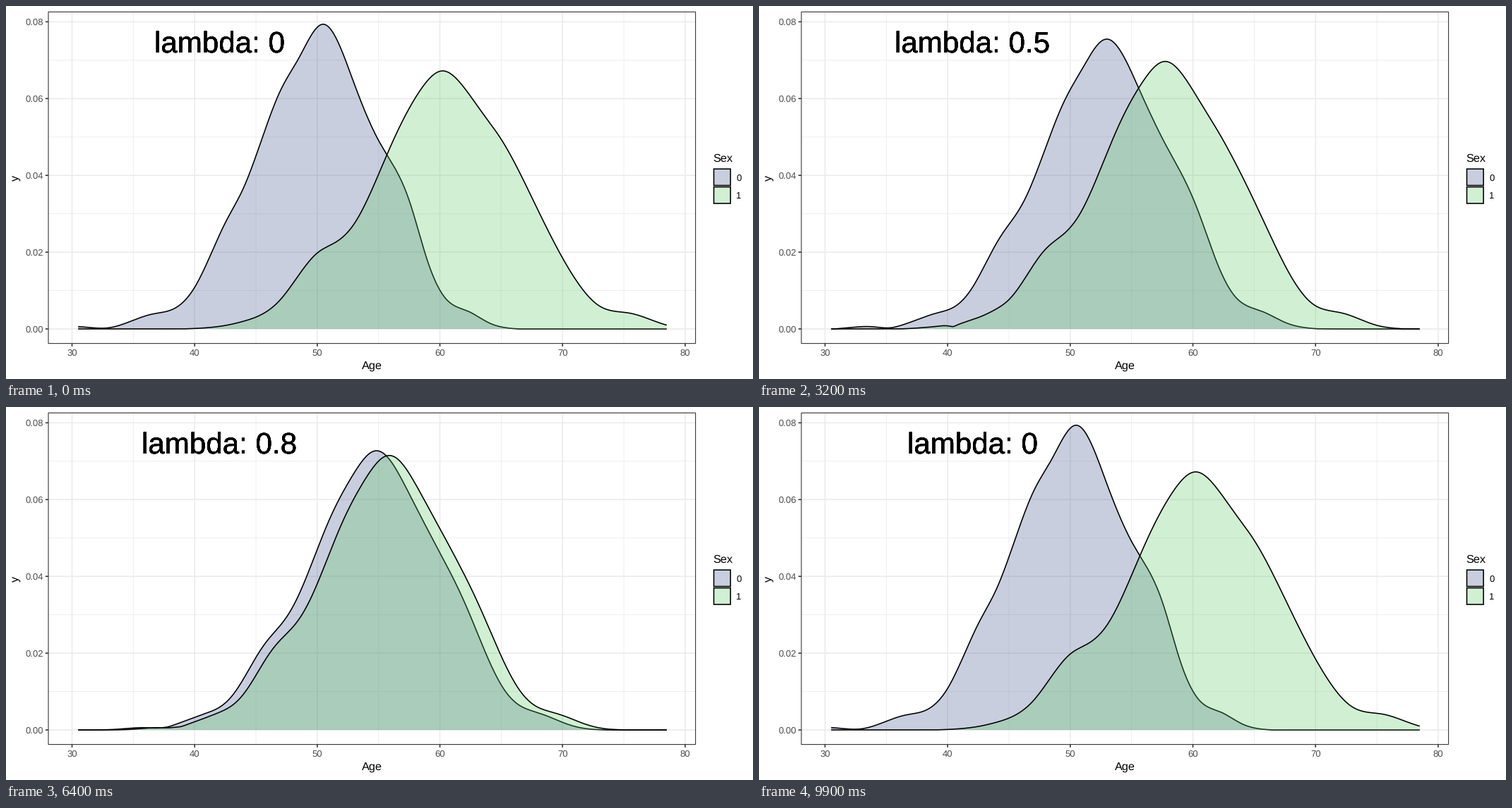
Animation, 1058 px wide and 529 px high, one loop 10 s. Source, as a matplotlib script:

```python
import numpy as np
import matplotlib.pyplot as plt
from matplotlib.animation import FuncAnimation
from matplotlib.patches import Polygon, Rectangle

W, H, DPI = 1058, 529, 128
PT = 72 / DPI  # points per pixel
BLUE, GREEN, ALPHA = "#3B528B", "#5DC863", 0.28
DARK, GRID = "#333333", "#EBEBEB"
LEFT, RIGHT, TOP, BOTTOM = 60, 976.6, 8.4, 478.6
LAMBDAS = [0, 0.5, 0.8, 1]

plt.rcParams["font.family"] = "Liberation Sans"
plt.rcParams["text.hinting"] = "none"

ages = np.linspace(24, 86, 3000)
shown = np.linspace(30.5, 78.5, 512)


def age_px(age):
    return 93.5 + (age - 30) * 17.368


def density_px(density):
    return 458 - density * 5445


def density_through(*points):
    """Natural cubic spline through (age, density in 1e-4) key points."""
    x, y = np.array(points, float).T
    h = np.diff(x)
    system = (np.diag(2 * (h[:-1] + h[1:]))
              + np.diag(h[1:-1], 1) + np.diag(h[1:-1], -1))
    bend = np.zeros(len(x))
    bend[1:-1] = np.linalg.solve(system, 6 * np.diff(np.diff(y) / h))
    i = np.clip(np.searchsorted(x, ages) - 1, 0, len(h) - 1)
    a = (x[i + 1] - ages) / h[i]
    b = 1 - a
    s = (a * y[i] + b * y[i + 1]
         + ((a**3 - a) * bend[i] + (b**3 - b) * bend[i + 1]) * h[i]**2 / 6)
    inside = (ages > x[0]) & (ages < x[-1])
    return np.maximum(np.where(inside, s, 0) * 1e-4, 1e-7)


def cumulative(density):
    total = np.cumsum(density)
    return total / total[-1]


def repair(own, other, lam):
    """Move each quantile of a group by lam towards the mean of both groups."""
    share = cumulative(own)
    twin = np.interp(share, cumulative(other), ages)
    moved = ages + lam * (twin - ages) / 2
    return np.interp(shown, moved, np.gradient(share, moved))


sex0 = density_through(
    (28, 0), (30.5, 6), (33, 3), (36.5, 38), (38.3, 52), (40, 107), (42.5, 274),
    (44, 365), (47, 616), (48.5, 700), (50.5, 788), (53, 636), (55, 488),
    (57.5, 333), (59, 176), (60.5, 78), (62.3, 46), (64, 16), (66, 1), (69, 0))
sex1 = density_through(
    (39, 0), (42.5, 9), (44, 20), (47, 76), (50, 197), (51.5, 225), (53, 272),
    (56, 475), (58.5, 624), (60.2, 670), (62, 626), (63.5, 560), (65, 493),
    (68, 309), (71, 132), (73, 60), (75.5, 41), (78.5, 10), (81, 0))

fig = plt.figure(figsize=(W / DPI, H / DPI), dpi=DPI, facecolor="white")
ax = fig.add_axes([0, 0, 1, 1])
ax.set_xlim(0, W)
ax.set_ylim(H, 0)
ax.axis("off")


def line(xs, ys, width, color, z):
    return ax.plot(xs, ys, lw=width * PT, color=color, zorder=z, snap=False,
                   solid_capstyle="butt", solid_joinstyle="round")[0]


def label(x, y, text, size, color="black", **align):
    return ax.text(x, y, text, fontsize=size * PT, color=color, zorder=9, **align)


# Panel grid, ticks and axis labels
for age in range(35, 80, 10):
    line([age_px(age)] * 2, [TOP, BOTTOM], 0.8, GRID, 1)
for pct in range(1, 8, 2):
    line([LEFT, RIGHT], [density_px(pct / 100)] * 2, 0.8, GRID, 1)
for age in range(30, 81, 10):
    x = age_px(age)
    line([x, x], [TOP, BOTTOM], 1.6, GRID, 2)
    line([x, x], [BOTTOM, BOTTOM + 4.2], 1.6, DARK, 2)
    label(x, 496.3, str(age), 13.1, "#4D4D4D", ha="center")
for pct in range(0, 9, 2):
    y = density_px(pct / 100)
    line([LEFT, RIGHT], [y, y], 1.6, GRID, 2)
    line([LEFT - 4.2, LEFT], [y, y], 1.6, DARK, 2)
    label(52.8, y + 4.7, f"{pct / 100:.2f}", 13.1, "#4D4D4D", ha="right")
ax.add_patch(Rectangle((LEFT, TOP), RIGHT - LEFT, BOTTOM - TOP, fill=False,
                       ec=DARK, lw=1.1 * PT, zorder=8, snap=False))
label(518.3, 514.6, "Age", 16.3, ha="center")
label(13.5, 243.5, "y", 16.3, ha="center", va="center", rotation=90)

# Legend
label(1001.3, 220.8, "Sex", 16.3)
for name, color, top in (("0", BLUE, 231.1), ("1", GREEN, 256.6)):
    box = (1002.5, top), 23.6, 23.4
    ax.add_patch(Rectangle(*box, fc=color, alpha=ALPHA, lw=0, zorder=3, snap=False))
    ax.add_patch(Rectangle(*box, fill=False, ec="black", lw=1.6 * PT, zorder=4,
                           snap=False))
    label(1034.4, top + 16.6, name, 13.1)

# Density areas
xs = age_px(shown)
areas = []
for own, other, color, z in ((sex0, sex1, BLUE, 4), (sex1, sex0, GREEN, 6)):
    states = [repair(own, other, lam) for lam in LAMBDAS]
    fill = ax.add_patch(Polygon([[0, 0], [1, 1], [1, 0]], fc=color, alpha=ALPHA,
                                lw=0, zorder=z))
    areas.append((states, fill, line(xs, xs, 1.6, "black", z + 1)))

# Stacked copies give the title its hard edges.
titles = [label(302, 66, "", 42.1, ha="center") for _ in range(6)]


def update(frame):
    progress = np.interp(frame, [5, 25, 31, 50, 55, 74, 80, 99],
                         [0, 1, 1, 2, 2, 3, 3, 4])
    state = int(progress)
    mix = progress - state
    for states, fill, outline in areas:
        ys = density_px((1 - mix) * states[state % 4] + mix * states[(state + 1) % 4])
        outline.set_ydata(ys)
        base = [[xs[-1], density_px(0)], [xs[0], density_px(0)]]
        fill.set_xy(np.vstack([np.column_stack([xs, ys]), base]))
    for title in titles:
        title.set_text(f"lambda: {LAMBDAS[int(progress + 0.5) % 4]}")


anim = FuncAnimation(fig, update, frames=100, interval=100, repeat=True)
plt.show()
```
